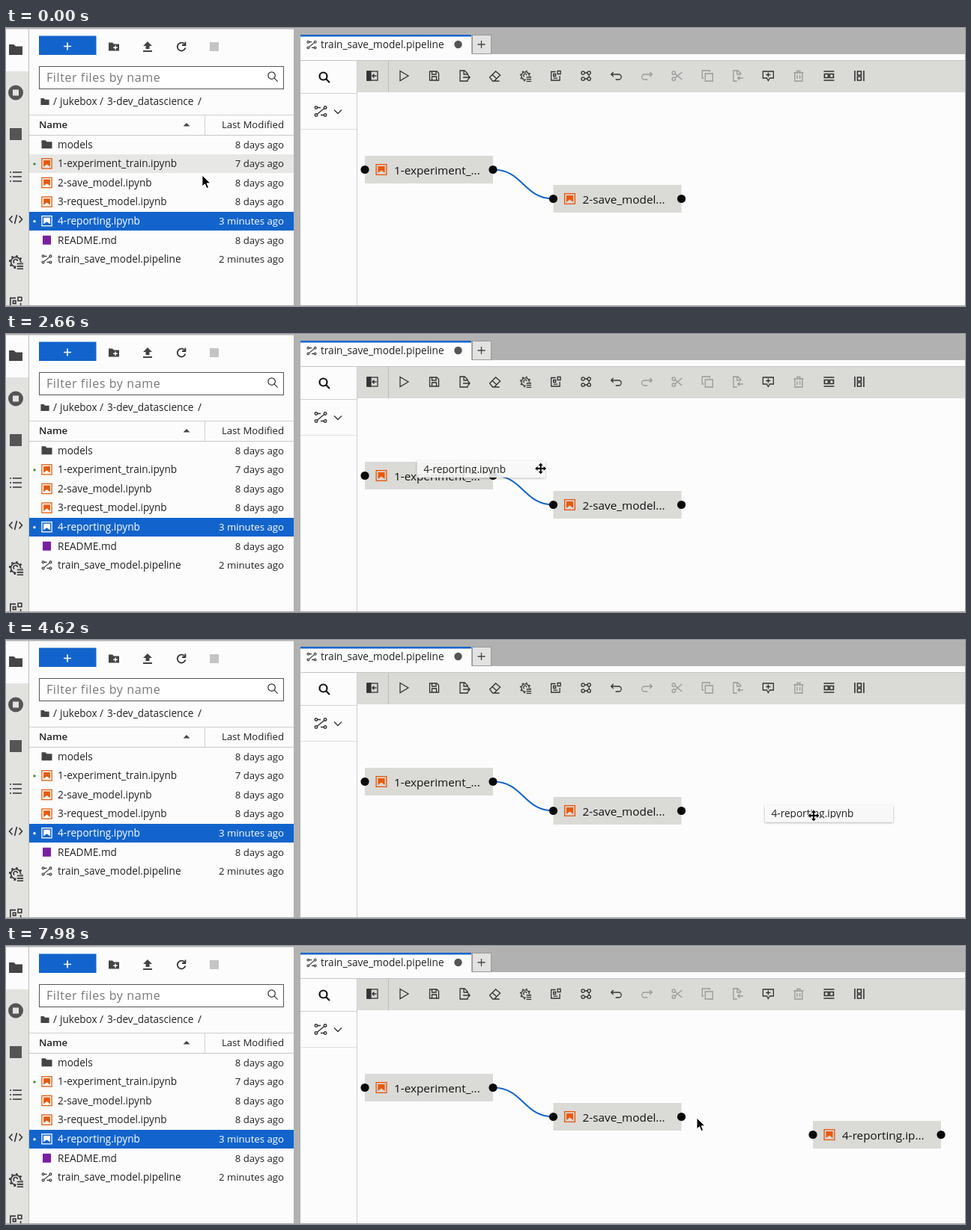
Recreate the animation shown at these times as an HTML page. Size 1280 px wide and 372 px high, loop 8000 ms.

```html
<!DOCTYPE html>
<html lang="en">
<head>
<meta charset="utf-8">
<title>Pipeline editor</title>
<style>
  html, body { margin: 0; height: 100%; overflow: hidden; background: #fcfcfc; }
  svg { display: block; width: 100vw; height: 100vh; }
  text { font: 13.6px "Open Sans", "Noto Sans", sans-serif; fill: #222; white-space: pre; }
  .date { font-size: 13.2px; text-anchor: end; }
  .head { font-weight: 600; font-size: 13.2px; }
  .hint { font-size: 16px; letter-spacing: .6px; fill: #777; }
  .label { font-size: 15.3px; fill: #111; }
  .cut { clip-path: inset(0 0 2.5px); }
  .icon { fill: none; stroke: #333; stroke-width: 1.3; }
  .off { stroke: #999; }
  .solid { fill: #444; stroke: none; }
</style>
</head>
<body>
<svg id="stage" viewBox="0 0 1280 372" preserveAspectRatio="none"></svg>
<script>
const LOOP = 8000, BLUE = '#1264cc', ORANGE = '#e8590c', BAR = '#dadad7';
const GRAB = 2450, DROP = 6740, HOVER_LAG = 80;
const ROW_TOP = 143, ROW_H = 25.6;

const rect = (x, y, w, h, fill, more = '') =>
  `<rect x="${x}" y="${y}" width="${w}" height="${h}" fill="${fill}" ${more}/>`;
const text = (x, y, s, cls = '', more = '') => `<text x="${x}" y="${y}" class="${cls}" ${more}>${s}</text>`;
const dot = (x, y, r, fill) => `<circle cx="${x}" cy="${y}" r="${r}" fill="${fill}"/>`;
const ring = (x, y, r, more = '') => `<circle cx="${x}" cy="${y}" r="${r}" ${more}/>`;
const path = (d, more = '') => `<path d="${d}" ${more}/>`;
const at = (x, y, body, cls = 'icon', scale = 1) =>
  `<g transform="translate(${x} ${y}) scale(${scale})" class="${cls}">${body}</g>`;

// Icons are drawn around their centre.
const folder = path('M-7-5.5h5l2 2h7v9h-14z');
const lens = ring(-1.5, -1.5, 5) + path('M2.2 2.2L7 7');
const flow = ring(-5.5, -4.5, 1.6) + ring(5.5, -4.5, 1.6) + ring(-5.5, 4.5, 1.6) + ring(5.5, 4.5, 1.6) +
  path('M-4-4.5H0M4.4-3.6L-4.4 3.6M0 4.5H4');
const gear = ring(0, 0, 5.2) + ring(0, 0, 6.5, 'stroke-width="1.6" stroke-dasharray="2 3.1"') +
  rect(.5, .5, 8, 8, BAR, 'stroke="none"') + path('M-1.5 1.2A2.2 2.2 0 1 1 2-.8M1.5 2H8M1.5 4.7H8M1.5 7.4H8');
const parts = path('M0-5.5H-6V6H5.5V0M2.5-6.5H6.5V-2.5H2.5zM-3-2.5H0V.5H-3zM-3 3.2H2.5');
const notebook = color =>
  rect(-6.6, -6.6, 13.2, 13.2, 'none', `stroke="${color}" stroke-width="1.3"`) +
  path('M-4.4-4.4H4.4V4.4L0 1L-4.4 4.4z', `fill="${color}" stroke="none"`);

const tools = [
  rect(-7, -6, 14, 12, 'none') + path('M-7-6h5V6h-5z', 'fill="#333"') + path('M5.5 0H0M2.5-2.5L0 0L2.5 2.5'),
  path('M-5-6.5L6 0L-5 6.5z'),
  path('M-6-6H3.5L6-3.5V6H-6zM-3-6V-2H2.5V-6M-3 6V1H3V6'),
  path('M4-1V-3L0-7H-6V7H4V5M-1-7V-2H4M-2 2H7M4.5-1L7 2L4.5 5'),
  path('M-7 2L1-6L7-1L-1 7H-3zM-3.5-1.5L2.5 4M-1 7H6'),
  gear,
  parts,
  [[-4, -4], [4, -4], [-4, 4], [4, 4]].map(p => ring(...p, 2.2)).join('') + path('M-2-4H2M-2 4H2M4-2V2'),
  path('M-4-5L-7-2L-4 1M-7-2H3A3.5 3.5 0 0 1 3 5H-1'),
  path('M4-5L7-2L4 1M7-2H-3A3.5 3.5 0 0 0-3 5H1'),
  ring(-4.5, -4, 2.2) + ring(-4.5, 4, 2.2) + path('M-2.7-2.7L6.5 5M-2.7 2.7L6.5-5'),
  path('M-3-3H7V7H-3zM-5 3H-7V-7H3V-5'),
  path('M4-2V-3L0-7H-6V7H-1M-1-7V-2H4M7 3H0M2.5 .5L0 3L2.5 5.5'),
  path('M-7-6H7V3H2L0 6.5L-2 3H-7zM-3-1.5H3M0-4.5V1.5'),
  path('M-6.5-4H6.5M-2-4V-6.5H2V-4M-5-4V7H5V-4M-1.8-1V4M1.8-1V4'),
  path('M-7-6H7M-7 6H7M-6-2.5H-1V2.5H-6zM1-2.5H6V2.5H1z', 'stroke-width="1.7"'),
  path('M-6-7V7M6-7V7M-2.5-6H2.5V-1H-2.5zM-2.5 1H2.5V6H-2.5z', 'stroke-width="1.6"'),
];
const disabled = [9, 10, 11, 12, 14];

const files = [
  ['models', '8 days ago'],
  ['1-experiment_train.ipynb', '7 days ago', '#3c8a3c'],
  ['2-save_model.ipynb', '8 days ago'],
  ['3-request_model.ipynb', '8 days ago'],
  ['4-reporting.ipynb', '3 minutes ago', '#fff'],
  ['README.md', '8 days ago'],
  ['train_save_model.pipeline', '2 minutes ago'],
];
const SELECTED = 4;
const rowY = i => Math.round(ROW_TOP + ROW_H * i + .3);

function fileRow([name, date, mark], i) {
  const y = ROW_TOP + ROW_H * (i + .5), on = i === SELECTED;
  const ink = on ? 'style="fill:#fff"' : '';
  const icon = i === 0 ? at(54.5, y, folder, 'solid')
    : i === 5 ? rect(49, y - 6, 11, 12, '#7b1fa2')
    : i === 6 ? at(54.5, y, flow, 'icon', .9)
    : at(54.5, y, notebook(on ? '#fff' : ORANGE), '');
  return (on ? rect(31, rowY(i), 353, 25, BLUE) : '') +
    (mark ? dot(38, y + .5, 1.7, mark) : '') + icon +
    text(69, y + 4.7, name, '', ink) + text(371, y + 4.7, date, 'date', ink);
}

const node = (x, y, label) =>
  rect(x, y, 171, 37, BAR) + dot(x, y + 18.5, 5.6, '#0a0a0a') + dot(x + 171, y + 18.5, 5.6, '#0a0a0a') +
  at(x + 22, y + 18.5, notebook(ORANGE), '', 1.04) + text(x + 39, y + 24.5, label, 'label');

const rail =
  rect(0, 0, 30, 372, '#fcfcfc') + rect(0, 58, 30, 314, '#e2e2df') +
  at(13, 29, folder, 'solid', 1.28) +
  dot(13, 86.5, 10, '#555') + rect(9, 82.5, 8, 8, '#e2e2df') +
  rect(5, 134, 16, 16, '#555') +
  at(13, 199, path('M-8-6H-6M-8 0H-6M-8 6H-6M-4-6H8M-4 0H8M-4 6H8', 'stroke-width="1.7"')) +
  at(13, 256, path('M-4.5-4.5L-8.5 0L-4.5 4.5M4.5-4.5L8.5 0L4.5 4.5M1.5-6L-1.5 6', 'stroke-width="1.6"')) +
  at(13, 313, gear, 'icon', 1.25) + at(13, 368, parts, 'icon', 1.2) +
  rect(30, 0, 1, 372, '#bdbdbd');

const browserTop =
  rect(44, 10.5, 76.5, 25.5, BLUE) + path('M82 19.5V29.5M77 24.5H87', 'stroke="#fff" stroke-width="1.7"') +
  at(144, 25, folder + path('M2-1.5V4M-.8 1.2H4.8', 'stroke="#fff" stroke-width="1.4"'), 'solid') +
  at(189, 25, path('M0-7L6-1H2.5V3H-2.5V-1H-6zM-6 5H6V7H-6z'), 'solid') +
  at(234, 25, path('M4.2-3.5A5.4 5.4 0 1 0 5.4 1.5M5.4-6.5V-2H1', 'stroke-width="1.8"')) +
  rect(272, 19, 12, 12, '#c4c4c4') +
  rect(44.5, 51.5, 326, 30, '#fff', 'stroke="#555"') + text(54, 71.7, 'Filter files by name', 'hint') +
  at(356, 65, lens, 'icon', .95) +
  at(52, 98.5, folder, 'solid', .8) +
  text(63, 102.6, '/') + text(72, 102.6, 'jukebox') + text(125, 102.6, '/') +
  text(135, 102.6, '3-dev_datascience') + text(256, 102.6, '/') +
  rect(31, 116, 353, 1, '#d0d0d0') + rect(31, 143, 353, 1, '#c8c8c8') + rect(265, 117, 1, 26, '#d0d0d0') +
  text(44, 133.7, 'Name', 'head') + path('M236.5 131.5L241 127L245.5 131.5z', 'fill="#444"') +
  text(371, 133.7, 'Last Modified', 'date');

const editor =
  rect(384, 0, 9, 372, '#b1b1b1') + rect(393, 0, 887, 36, '#b1b1b1') +
  rect(393, 35, 887, 8, '#fcfcfc') + rect(393, 9, 228, 27, '#fcfcfc') + rect(393, 9, 228, 2.5, BLUE) +
  at(408, 22.5, flow, 'icon', .85) + text(420, 27, 'train_save_model.pipeline') + dot(603.5, 22, 5.2, '#555') +
  rect(622.5, 9.5, 25, 25, '#e2e2e0', 'stroke="#999"') + path('M634.5 17V27M629.5 22H639.5', 'stroke="#444" stroke-width="1.3"') +
  rect(393, 43, 887, 1, '#c4c4c4') + rect(469, 44, 811, 42, BAR) + rect(510, 44, 1, 42, '#bcbcbc') +
  rect(468, 44, 1, 328, '#cfcfcf') + rect(393, 87, 75, 1, '#d0d0d0') + rect(393, 135, 75, 1, '#dedede') +
  at(425, 66, `<g stroke-width="2.2" stroke="#111">${lens}</g>`) +
  at(420, 111.5, flow, 'icon', 1.1) + path('M438 109.5L443 114.5L448 109.5', 'class="icon"') +
  tools.map((t, i) => at(i ? 531 + (i - 1) * 40.53 : 489, 64, t, disabled.includes(i) ? 'icon off' : 'icon')).join('');

const graph =
  path('M650 189.5C690.5 189.5 690.5 228.5 731 228.5', `fill="none" stroke="${BLUE}" stroke-width="2"`) +
  node(479, 171, '1-experiment_...') + node(730.5, 210, '2-save_model...') +
  `<g id="added">${node(1077, 234, '4-reporting.ip...')}</g>`;

const arrows = 'M0-7.5L3-4H1V-1H4V-3L7.5 0L4 3V1H1V4H3L0 7.5L-3 4H-1V1H-4V3L-7.5 0L-4-3V-1H-1V-4H-3z';
const overlay =
  `<g id="ghost">${rect(0, 0, 171, 22, '#fff', 'fill-opacity=".82" filter="url(#shadow)"')}` +
  text(8.5, 15.5, files[SELECTED][0], 'cut') + '</g>' +
  path('M0 0V15L3.6 11.8L6 17.5L8.6 16.4L6.2 10.8H11z', 'id="arrow" fill="#000" stroke="#fff"') +
  path(arrows, 'id="mover" fill="#000" stroke="#fff" stroke-width="1.6" paint-order="stroke"');

const stage = document.getElementById('stage');
stage.innerHTML =
  '<defs><filter id="shadow" x="-5%" y="-40%" width="110%" height="190%">' +
  '<feDropShadow dx="0" dy="1" stdDeviation="1.5" flood-opacity=".4"/></filter></defs>' +
  rect(0, 0, 1280, 372, '#fcfcfc') + rail + browserTop +
  rect(31, 0, 353, 25, '#e7e7e6', 'id="hover"') + files.map(fileRow).join('') +
  editor + graph + rect(0, 0, 1280, 1.5, '#b5b5b5') + rect(0, 371, 1280, 1, '#a8a8a8') + overlay;

const [hover, added, ghost, arrow, mover] =
  ['hover', 'added', 'ghost', 'arrow', 'mover'].map(id => document.getElementById(id));

// Keys are [time, x, y].
const pointerKeys = [
  [-100, 272, 183], [0, 262, 197], [400, 222, 226], [820, 224, 250], [1500, 226, 259], [GRAB, 226, 259],
  [2660, 713, 180], [3320, 1144, 240], [3660, 1084, 237], [3860, 1078, 235], [7250, 1078, 235],
  [7900, 922, 230], [LOOP, 922, 230],
];
const ghostKeys = [
  [GRAB, 161, 247], [2660, 548, 170], [3380, 1081, 226], [3660, 1025, 222.5], [3900, 1013, 221.5], [DROP, 1013, 221.5],
];

function along(keys, t) {
  const i = Math.max(1, keys.findIndex(k => k[0] >= t));
  const [t0, x0, y0] = keys[i - 1], [t1, x1, y1] = keys[i];
  const p = (t - t0) / (t1 - t0);
  return [x0 + (x1 - x0) * p, y0 + (y1 - y0) * p];
}
const place = (el, [x, y]) => el.setAttribute('transform', `translate(${x} ${y})`);
const show = (el, on) => el.setAttribute('display', on ? 'inline' : 'none');

function draw() {
  const t = performance.now() % LOOP;
  const dragging = t >= GRAB && t < DROP;
  const pos = along(pointerKeys, t);
  // The row highlight trails the pointer a little.
  const row = Math.floor((along(pointerKeys, t - HOVER_LAG)[1] - ROW_TOP) / ROW_H);
  show(hover, t < GRAB && row !== SELECTED);
  place(hover, [0, rowY(row)]);
  show(added, t >= DROP);
  show(ghost, dragging);
  if (dragging) place(ghost, along(ghostKeys, t));
  show(mover, dragging);
  show(arrow, !dragging);
  place(mover, pos);
  place(arrow, pos);
  requestAnimationFrame(draw);
}
draw();
</script>
</body>
</html>
```
